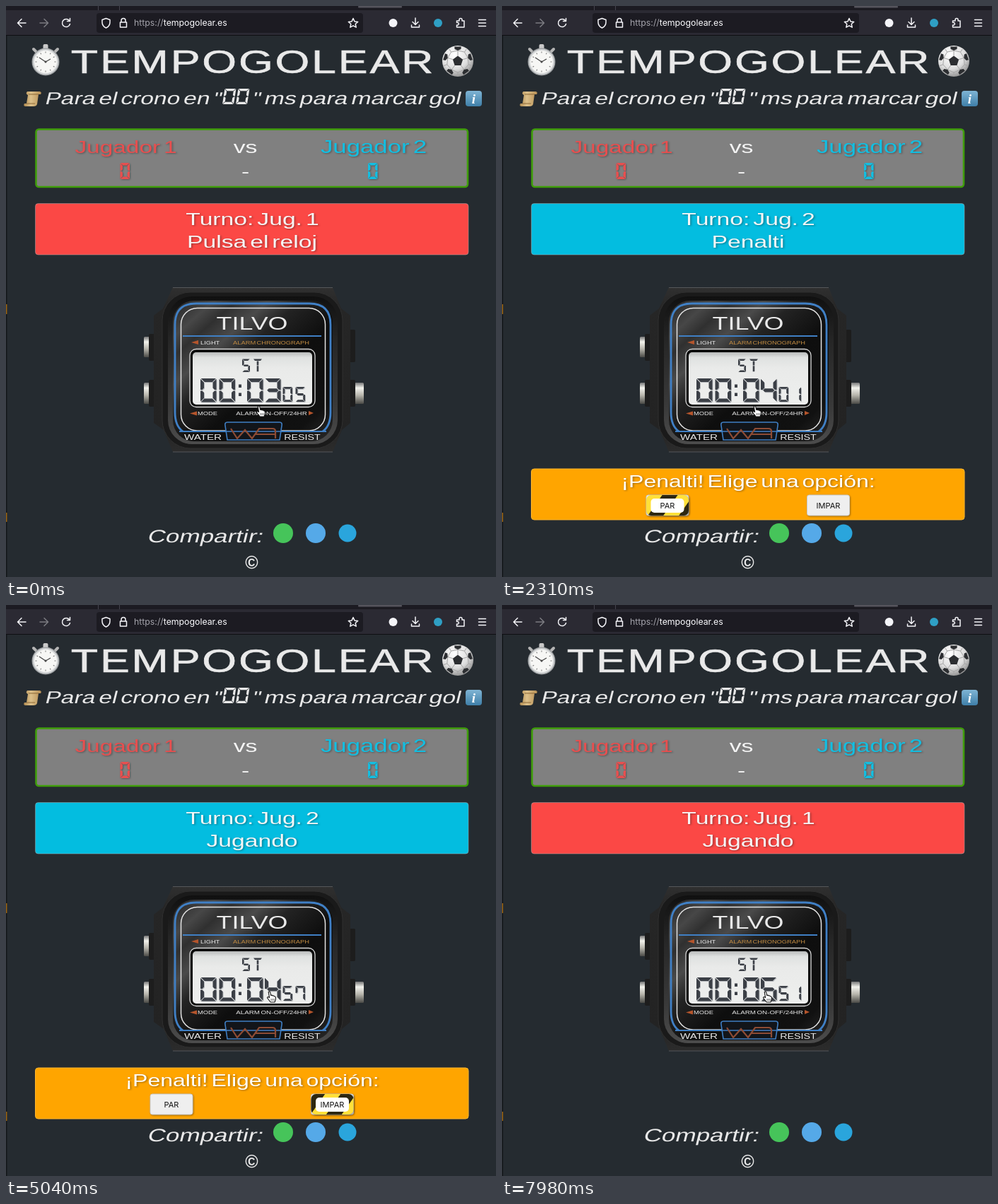
An HTML page that plays this animation: 693 by 808 pixels, repeating every 8000 ms.

```html
<!DOCTYPE html>
<html lang="es">
<head>
<meta charset="utf-8">
<title>Tempogolear</title>
<style>
html, body { margin: 0; width: 100%; height: 100%; overflow: hidden; background: #252b30; }
svg { display: block; width: 693px; height: 808px; }
text { font-family: "Liberation Sans", Arial, sans-serif; white-space: pre; word-spacing: -.13em; }
.ui { font-family: Inter, "Open Sans", sans-serif; }
.icon { fill: none; stroke: #f4f4f8; stroke-width: 1.5; stroke-linecap: round; stroke-linejoin: round; }
.soft { filter: drop-shadow(1px 1px 1px rgba(20, 20, 20, .4)); }
</style>
</head>
<body>
<svg id="stage" viewBox="0 0 693 808" xmlns="http://www.w3.org/2000/svg"></svg>
<script>
const LOOP = 8000, STEP = 70, WIDE = 1.38;
const RED = '#fb4845', CYAN = '#03bde0', PALE = '#e9e9e9', INK = '#3b3f46';

// start, stop, centiseconds at start, player, player afterwards, label afterwards
const RUNS = [
  [480, 950, 305, 1, 2, 'Pulsa el reloj'],
  [1480, 1970, 352, 2, 2, 'Penalti'],
  [4480, 5230, 401, 2, 1, 'Pulsa el reloj'],
  [5940, 6250, 476, 1, 2, 'Pulsa el reloj'],
  [6980, 7120, 507, 2, 1, 'Pulsa el reloj'],
  [7680, 9000, 521, 1, 2, 'Pulsa el reloj']
];
const RINGS = [[280, 470], [900, 1040], [1330, 1470], [1900, 2050], [3430, 3570], [4340, 4480],
  [5170, 5310], [5880, 5945], [6200, 6430], [6790, 6970], [7080, 7200], [7490, 7670]];
const HAND = [[0, 360, 573], [2450, 360, 573], [3080, 432, 692], [3300, 461, 716],
  [3700, 461, 716], [3920, 418, 640], [4060, 375, 554], [8000, 375, 554]];
const PENALTY = [1970, 5230], CHOICE = 3570, PRESS = 90;

const within = (t, [a, b]) => t >= a && t < b;

function label(x, y, size, str, o = {}) {
  const lean = o.lean ? ' skewX(-14)' : '';
  return `<text transform="translate(${x} ${y})${lean} scale(${WIDE} 1)" font-size="${size}"
    text-anchor="${o.at || 'middle'}" fill="${o.fill || PALE}" letter-spacing="${o.gap || 0}"
    ${o.bold ? `stroke="${PALE}" stroke-width="${o.bold}"` : ''}
    ${o.id ? `id="${o.id}"` : ''} ${o.soft ? 'class="soft"' : ''}>${str}</text>`;
}
const box = (x, y, w, h, r, fill, more = '') =>
  `<rect x="${x}" y="${y}" width="${w}" height="${h}" rx="${r}" fill="${fill}" ${more}/>`;
const disc = (x, y, r, fill, more = '') => `<circle cx="${x}" cy="${y}" r="${r}" fill="${fill}" ${more}/>`;
const icon = (d, more = '') => `<path class="icon" d="${d}" ${more}/>`;

// Seven-segment glyphs with mitred corners
const SEGS = ['abcdef', 'bc', 'abdeg', 'abcdg', 'bcfg', 'acdfg', 'acdefg', 'abcf', 'abcdefg', 'abcdfg'];
function digit(n, x, y, w, h, t) {
  const g = t * .14, m = h / 2, k = t / 2;
  const poly = pts => 'M' + pts.map(([px, py]) => `${(x + px).toFixed(2)} ${(y + py).toFixed(2)}`).join('L') + 'Z';
  const flipX = pts => pts.map(([px, py]) => [w - px, py]);
  const flipY = pts => pts.map(([px, py]) => [px, h - py]);
  const a = [[g, 0], [w - g, 0], [w - t - g, t], [t + g, t]];
  const f = [[0, g], [t, t + g], [t, m - k - g], [k, m - g], [0, m - g]];
  const bar = [[k + g, m], [t + g, m - k], [w - t - g, m - k], [w - k - g, m], [w - t - g, m + k], [t + g, m + k]];
  const parts = { a, f, g: bar, b: flipX(f), d: flipY(a), e: flipY(f), c: flipX(flipY(f)) };
  return [...SEGS[n]].map(s => poly(parts[s])).join('');
}
function clockPath(cs) {
  const two = v => String(v).padStart(2, '0');
  const big = '00' + two(Math.floor(cs / 100)), small = two(cs % 100);
  return [275, 301.5, 341, 366].map((x, i) => digit(+big[i], x, 527, 22.5, 33.5, 5)).join('') +
    [391.5, 409.5].map((x, i) => digit(+small[i], x, 539, 13.5, 21, 2.8)).join('');
}

function defs() {
  const stops = list => list.map(([o, c]) => `<stop offset="${o}" stop-color="${c}"/>`).join('');
  const lin = (id, dir, list) => `<linearGradient id="${id}" ${dir}>${stops(list)}</linearGradient>`;
  return `<defs>
    ${lin('metal', 'x2="0" y2="1"', [[0, '#777'], [.25, '#f2f2ec'], [.6, '#b5b3aa'], [1, '#4a4a46']])}
    ${lin('case', 'x2="0" y2="1"', [[0, '#303030'], [.12, '#262626'], [.85, '#232323'], [1, '#2c2c2c']])}
    ${lin('rim', 'x2="0" y2="1"', [[0, '#101010'], [.3, '#262626'], [.75, '#3a3a3a'], [1, '#4c4c4c']])}
    ${lin('face', 'x2="1" y2="1"', [[0, '#222'], [.13, '#474747'], [.2, '#303030'], [.3, '#4a4a4a'],
      [.4, '#232323'], [.58, '#0e0e0e'], [.85, '#111'], [1, '#2b2b2b']])}
    ${lin('lcd', 'x2="0" y2="1"', [[0, '#b9bbbb'], [.1, '#dfe1e0'], [.3, '#e9eae9'], [1, '#eeefee']])}
    ${lin('paper', 'x2="1" y2="0"', [[0, '#b08a50'], [.4, '#dcc08a'], [1, '#b78f55']])}
    ${lin('info', 'x2="0" y2="1"', [[0, '#7fb4d4'], [1, '#3f7fa8']])}
    <radialGradient id="ball" cx=".4" cy=".3" r=".75">${stops([[0, '#fff'], [.6, '#dedede'], [1, '#8c8c8c']])}</radialGradient>
    <pattern id="stripes" width="36" height="36" patternUnits="userSpaceOnUse">
      <rect width="36" height="36" fill="#ffe03a"/><rect width="18" height="36" fill="#2d2710"/>
    </pattern></defs>`;
}

function browser() {
  return box(0, 0, 693, 7, 0, '#1c1b22') + box(130, 0, 1, 6, 0, '#45444d') + box(160, 0, 1, 6, 0, '#45444d') +
    box(498, 0, 62, 2.5, 1, '#55545c') +
    box(0, 6, 693, 35, 0, '#2b2a33') + box(0, 41, 693, 1, 0, '#0e0e12') +
    box(128, 10, 377, 28, 4, '#1c1b22') +
    icon('M28 24H17M22 18.5L16.5 24L22 29.5') +
    icon('M48 24H59M54 18.5L59.5 24L54 29.5', 'opacity=".4"') +
    icon('M89.5 20.5A5.6 5.6 0 1 0 90.5 25.5M90.5 17.5V21.5H86.5') +
    icon('M141.5 17.5L147 19.5V23Q147 28.5 141.5 31Q136 28.5 136 23V19.5Z') +
    icon('M161.5 23H170.5V30H161.5ZM163 23V20.5A3 3 0 0 1 169 20.5V23') +
    `<text class="ui" x="181" y="28.3" font-size="12.3" fill="#a3a2aa">https://<tspan fill="#fbfbfe">tempogolear.es</tspan></text>` +
    icon('M491 17.5L493 21.9L497.7 22.4L494.2 25.5L495.2 30.2L491 27.8L486.8 30.2L487.8 25.5L484.3 22.4L489 21.9Z') +
    disc(547.5, 24, 6, '#f4f4f8') +
    icon('M579 17V26M575 22.5L579 26.5L583 22.5M573.5 27V30H584.5V27') +
    disc(611, 24, 6, '#2f9fc4') +
    icon('M637.5 21H641V19.5A2 2 0 0 1 645 19.5V21H648V30H637.5V27H639A1.8 1.8 0 0 0 639 23.5H637.5Z') +
    icon('M668.5 19.5H678.5M668.5 24H678.5M668.5 28.5H678.5') +
    box(0, 42, 1.5, 766, 0, '#14171a') + box(0, 422, 1.5, 14, 0, '#9a6411') + box(0, 717, 1.5, 13, 0, '#9a6411');
}

function stopwatch() {
  let ticks = '';
  for (let i = 0; i < 12; i++)
    ticks += `<path d="M0 -14.5V-12.5" stroke="#777" transform="translate(56 79) rotate(${i * 30})"/>`;
  return box(52.5, 54, 7, 8, 2, '#c9c9c9') +
    `<path d="M42 64L39 61M70 64L73 61" stroke="#b5b5b5" stroke-width="4" stroke-linecap="round"/>` +
    disc(56, 79, 19.5, '#9ea1a3') + disc(56, 79, 18, '#d5d7d8') + disc(56, 79, 16, '#f7f7f5') + ticks +
    `<path d="M56 79L47 73M56 79L63 75" stroke="#444" stroke-width="1.2"/>` + disc(56, 79, 1.5, '#444');
}

function ball() {
  const at = (r, deg) => {
    const a = (deg - 90) * Math.PI / 180;
    return `${(639 + r * Math.cos(a)).toFixed(1)} ${(78 + r * Math.sin(a)).toFixed(1)}`;
  };
  const five = [0, 72, 144, 216, 288];
  const seams = five.map(a => `M${at(7.5, a)}L${at(15, a)}L${at(16, a + 36)}L${at(15, a + 72)}M${at(16, a + 36)}L${at(21, a + 36)}`).join('');
  const edges = five.map(a => `M${at(15, a)}L${at(17.5, a - 15)}L${at(21, a - 13)}L${at(21, a + 13)}L${at(17.5, a + 15)}Z`).join('');
  return disc(639, 78, 22, 'url(#ball)') +
    `<path d="${seams}" fill="none" stroke="#a5a5a5"/>
     <path d="M${five.map(a => at(7.5, a)).join('L')}Z${edges}" fill="#2c2e31"/>`;
}

function header() {
  return stopwatch() + ball() + label(349.5, 94.5, 45.5, 'TEMPOGOLEAR', { gap: 2, bold: .6 }) +
    `<path d="M30 121H48Q51 122 49 125H46L44 139Q43 142 39 142H27Q24 141 26 138H29L31 126Q27 124 30 121Z" fill="url(#paper)"/>
     <path d="M32 125H46M29 138H41" stroke="#8d6937" fill="none"/>` +
    label(54, 139, 24.3, 'Para el crono en "', { at: 'start', lean: 1 }) +
    `<path transform="translate(0 139) skewX(-9)" fill="${PALE}"
      d="${digit(0, 306, -22, 16, 22, 3.2)}${digit(0, 325, -22, 16, 22, 3.2)}"/>` +
    label(642, 139, 24.5, '" ms para marcar gol', { at: 'end', lean: 1 }) +
    box(650, 120, 23, 22, 4, 'url(#info)') +
    `<text x="661.5" y="138" font-size="19" font-style="italic" font-weight="bold" text-anchor="middle" fill="#fff"
      style="font-family:'Liberation Serif',serif">i</text>`;
}

function scores() {
  const zero = (x, fill) => `<path class="soft" fill="${fill}" d="${digit(0, x, 222, 13.5, 23, 3.4)}"/>`;
  return box(42.5, 174.5, 610.5, 81.5, 4, '#808080', 'stroke="#3f9d0a" stroke-width="2.6"') +
    label(169.5, 208, 24.2, 'Jugador 1', { fill: '#e84f4f', soft: 1 }) +
    label(338.5, 208, 24.4, 'vs', { fill: '#f4f4f4' }) +
    label(520, 208, 25.2, 'Jugador 2', { fill: '#12bfe2', soft: 1 }) +
    zero(161.5, '#e84f4f') + label(338.5, 242, 24.4, '-', { fill: '#f4f4f4' }) + zero(512, '#12bfe2');
}

function banner() {
  return `<rect id="turn" x="41.5" y="279.5" width="612.5" height="72.5" rx="4" stroke="#aaa" stroke-opacity=".5"/>` +
    label(348.5, 309.5, 24.4, '', { id: 'who', soft: 1, fill: '#f6f6f6' }) +
    label(348, 342, 24.4, '', { id: 'what', soft: 1, fill: '#f6f6f6' });
}

function watch() {
  const arrow = (x, y, s) => `<path d="M${x} ${y}l${s * 10} -3v6z" fill="#b5552c"/>`;
  const metal = (x, y, w, h, id = '') => box(x, y, w, h, 1.5, 'url(#metal)', id);
  return metal(195, 468, 9, 29) + metal(195, 533, 9, 30) + metal(493, 533, 13, 30, 'id="knob"') +
    box(202, 464, 10, 38, 2, '#1d1d1d') + box(202, 529, 10, 38, 2, '#1d1d1d') +
    box(484, 458, 10, 46, 2, '#1d1d1d') + box(484, 529, 10, 38, 2, '#1d1d1d') +
    `<path d="M236 398H462L474 428L487 438V590L475 600L462 631H236L223 600L209 590V438L222 428Z" fill="url(#case)"/>
     <path d="M236 398.5H462M236 631H462" stroke="#55575a"/>` +
    box(221, 405, 255, 221, 40, '#1a1a1a', 'stroke="#303030"') + box(229, 411, 240, 209, 34, 'url(#rim)') +
    box(236, 417, 226, 199, 30, 'url(#face)') +
    `<path d="M250 602Q239 594 239 575V451Q239 421 269 421H429Q459 421 459 451V575Q459 594 448 602" fill="none" stroke="#4080c6" stroke-width="2.8"/>` +
    box(247.5, 427.5, 204, 173.5, 23, 'none', 'stroke="#e4e4e4" stroke-width="1.5"') +
    `<path d="M250 467H446M245 602H453" stroke="#3f7fc4" stroke-width="1.8"/>` +
    label(348, 458, 26, 'TILVO') +
    arrow(262, 476, 1) + label(275, 478.5, 6.7, 'LIGHT', { at: 'start' }) +
    label(375, 478.5, 6.75, 'ALARM CHRONOGRAPH', { fill: '#c28c42' }) +
    box(260, 485.5, 177, 82, 9, '#0b0b0b', 'stroke="#d8d8d8" stroke-width="1.3"') +
    box(264, 490, 169, 74, 5, 'url(#lcd)') +
    `<path fill="${INK}" d="${digit(5, 334, 499.5, 11, 18.5, 2.6)}M350 499.5h12l-2 2.6h-8zM354.7 502.6h2.6v6h-2.6zM354.7 509.3h2.6v8h-2.6z"/>` +
    box(329, 535.5, 4, 4.5, 0, INK) + box(329, 547.5, 4, 4.5, 0, INK) +
    `<path id="clock" fill="${INK}" style="filter:drop-shadow(1px 1px .5px rgba(90,95,105,.35))"/>` +
    arrow(260, 576.5, 1) + label(271, 578.8, 6.75, 'MODE', { at: 'start' }) +
    label(375.5, 578.8, 7.1, 'ALARM ON-OFF/24HR') + arrow(435, 576, -.7) +
    label(278.5, 613.5, 11, 'WATER') + label(419, 613.5, 10.3, 'RESIST') +
    `<path d="M313 589H387Q391 589 390 594L387 614H313L310 594Q309 589 313 589Z" fill="#12151a" stroke="#3f7fc4" stroke-width="1.6"/>
     <path d="M311 602H389" stroke="#3f7fc4" stroke-width="1.5"/>
     <path d="M318 598L327 612L338 600L348 612L358 598H377Q381 598 381 602V612M353 606H381" fill="none" stroke="#8d4c35" stroke-width="2.2"/>`;
}

function penalty() {
  const button = (x, name) => `<g class="soft">${box(x - 30, 692, 60, 29, 3, '#efefef', 'stroke="#c9ccd0"')}</g>
    <g id="${name}" class="soft">${box(x - 30, 692, 60, 29, 7, 'url(#stripes)')}${box(x - 23.5, 697, 47, 20, 5, '#fff')}</g>
    <text class="ui" x="${x}" y="711" font-size="11" text-anchor="middle" fill="#111">${name}</text>`;
  return `<g id="penalty">${box(41.5, 655, 612.5, 72, 4, '#ffa500', 'stroke="#ffb52e"')}` +
    label(348, 681, 23.2, '¡Penalti! Elige una opción:', { fill: '#fff', soft: 1 }) +
    button(234, 'PAR') + button(461.5, 'IMPAR') + '</g>';
}

function footer() {
  return label(199, 759, 25.4, 'Compartir:', { at: 'start', lean: 1 }) +
    disc(392, 746, 14, '#46c45a') + disc(438, 746, 14, '#55a9e8') + disc(483, 746, 12.5, '#2aa5dc') +
    `<text x="347.5" y="796" font-size="25" font-weight="bold" text-anchor="middle" fill="${PALE}">©</text>`;
}

function pointer() {
  return `<g id="hand"><g id="ring" fill="none"><circle cx="-1.5" cy="-6.5" r="27.8" stroke="#fff" stroke-opacity=".4"/>
    <circle cx="-1.5" cy="-6.5" r="27" stroke="#111" stroke-width="1.3"/></g>
    <path d="M-3.8 -6.3Q-2.5 -7.8 -1.3 -6L-.3 -1.6Q1.3 -2.3 2 -1.1Q3.6 -1.6 4.3 -.3Q6 -.5 6.3 1.2V4.3L5 8H-.8L-5.5 2Q-5.4 0 -3.3 .9L-2.4 1.6Z"
      fill="#fff" stroke="#111" stroke-width="1.1" stroke-linejoin="round"/>
    <path d="M0 3V6M2 3V6M4 3V6" stroke="#333" stroke-width=".7"/></g>`;
}

document.getElementById('stage').innerHTML = defs() + box(0, 0, 693, 808, 0, '#252b30') + browser() + header() +
  scores() + banner() + watch() + penalty() + footer() + pointer();
const el = id => document.getElementById(id);
const show = (id, on) => el(id).setAttribute('visibility', on ? 'inherit' : 'hidden');

function stateAt(t) {
  let s = { cs: 305, player: 1, what: 'Pulsa el reloj' };
  for (const [start, stop, from, player, next, after] of RUNS) {
    if (t < start) break;
    s = t < stop
      ? { cs: from + Math.floor((t - start) / 10), player, what: 'Jugando' }
      : { cs: from + (stop - start) / 10, player: next, what: after };
  }
  return s;
}
function handAt(t) {
  const i = HAND.findIndex(k => k[0] > t), a = HAND[i - 1], b = HAND[i], p = (t - a[0]) / (b[0] - a[0]);
  return [a[1] + (b[1] - a[1]) * p, a[2] + (b[2] - a[2]) * p];
}

function draw(time) {
  const t = Math.floor(time / STEP) * STEP, s = stateAt(t);
  el('turn').setAttribute('fill', s.player === 1 ? RED : CYAN);
  el('who').textContent = 'Turno: Jug. ' + s.player;
  el('what').textContent = s.what;
  el('clock').setAttribute('d', clockPath(s.cs));
  const pressed = RUNS.some(r => within(t, [r[0], r[0] + PRESS]) || within(t, [r[1], r[1] + PRESS]));
  el('knob').setAttribute('x', pressed ? 490 : 493);
  show('penalty', within(t, PENALTY));
  show('PAR', t < CHOICE);
  show('IMPAR', t >= CHOICE);
  el('stripes').setAttribute('patternTransform', `translate(${t * .045 % 48} 0) rotate(35)`);
  el('hand').setAttribute('transform', `translate(${handAt(t).join(' ')})`);
  show('ring', RINGS.some(r => within(t, r)));
}

const began = performance.now();
function tick() {
  draw((performance.now() - began) % LOOP);
  requestAnimationFrame(tick);
}
tick();
</script>
</body>
</html>
```
